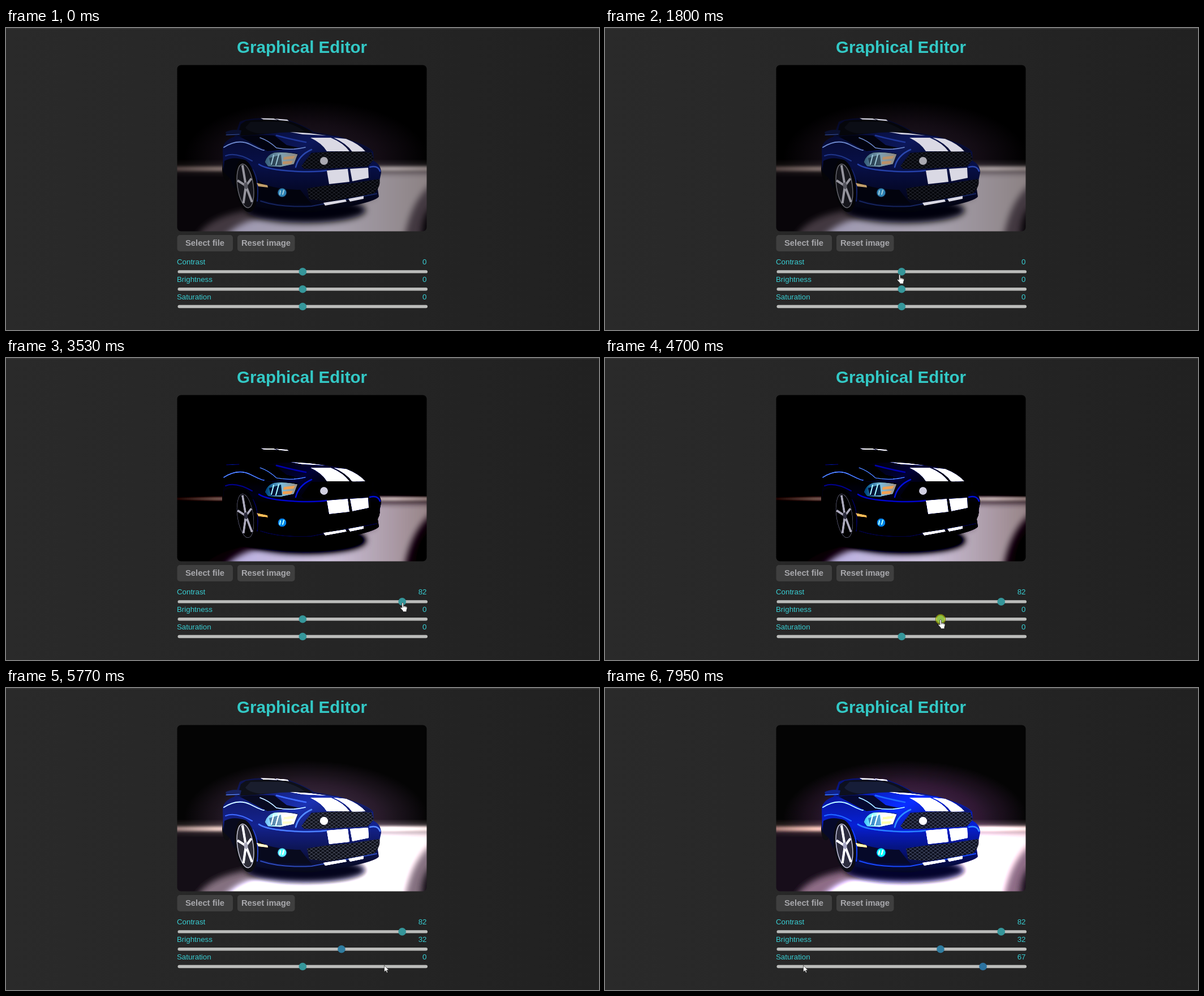
Recreate the animation shown at these times as an HTML page. Size 1048 px wide and 534 px high, loop 8 s.

```html
<!DOCTYPE html>
<html lang="en">
<head>
<meta charset="utf-8">
<title>Graphical Editor</title>
<style>
html, body { margin: 0; width: 100%; height: 100%; overflow: hidden; background: #262626; }
svg { display: block; width: 100vw; height: 100vh; }
text { font-family: "Liberation Sans", Arial, sans-serif; }
.title { font-size: 29.6px; font-weight: bold; fill: #33c9c6; text-anchor: middle; }
.button { font-size: 14.8px; font-weight: bold; fill: #a8a8ac; text-anchor: middle; }
.label { font-size: 13.3px; fill: #38cdd2; }
.value { text-anchor: end; }
.white { fill: #dad9e4; }
.shine { fill: none; stroke-linecap: round; }
</style>
</head>
<body>
<svg viewBox="0 0 1048 534" xmlns="http://www.w3.org/2000/svg">
<defs>
  <linearGradient id="page"><stop stop-color="#2a2a2a"/><stop offset="1" stop-color="#212121"/></linearGradient>
  <radialGradient id="glow"><stop stop-color="#241b27"/><stop offset=".6" stop-color="#130c14"/><stop offset="1" stop-color="#000"/></radialGradient>
  <linearGradient id="horizon"><stop stop-color="#4a3c3b"/><stop offset=".17" stop-color="#7a6a66"/><stop offset=".85" stop-color="#a3999a"/><stop offset="1" stop-color="#857a79"/></linearGradient>
  <linearGradient id="light"><stop stop-color="#9d98b2"/><stop offset=".5" stop-color="#a8a2b0"/><stop offset="1" stop-color="#8b8182"/></linearGradient>
  <linearGradient id="hood" x2="1" y2=".5"><stop stop-color="#060b32"/><stop offset=".55" stop-color="#0c175a"/><stop offset="1" stop-color="#050928"/></linearGradient>
  <linearGradient id="body" x2="0" y2="1"><stop stop-color="#050826"/><stop offset=".5" stop-color="#081048"/><stop offset=".8" stop-color="#040724"/><stop offset="1" stop-color="#01020a"/></linearGradient>
  <linearGradient id="lamp"><stop stop-color="#315a78"/><stop offset=".5" stop-color="#7fa0b0"/><stop offset="1" stop-color="#8e8780"/></linearGradient>
  <pattern id="mesh" width="8" height="6" patternUnits="userSpaceOnUse"><path d="M0 0L8 6M8 0L0 6" stroke="#262831" stroke-width=".9"/></pattern>
  <filter id="soft" x="-20%" y="-40%" width="140%" height="180%"><feGaussianBlur stdDeviation="6"/></filter>
  <filter id="thin" x="-10%" y="-200%" width="120%" height="500%"><feGaussianBlur stdDeviation="3 2"/></filter>
  <clipPath id="frame"><rect x="302.5" y="65.5" width="441" height="294" rx="7"/></clipPath>
  <filter id="adjust" filterUnits="userSpaceOnUse" x="302" y="65" width="442" height="295" color-interpolation-filters="sRGB">
    <feComponentTransfer><feFuncR type="linear"/><feFuncG type="linear"/><feFuncB type="linear"/></feComponentTransfer>
    <feColorMatrix id="saturate" type="saturate" values="1"/>
  </filter>
</defs>

<rect width="1048" height="534" fill="url(#page)"/>
<rect width="1048" height="2" fill="#363636"/>
<text class="title" x="523" y="44">Graphical Editor</text>

<g clip-path="url(#frame)"><g filter="url(#adjust)">
  <rect x="302" y="65" width="442" height="295" fill="#000"/>
  <ellipse cx="530" cy="228" rx="215" ry="100" fill="url(#glow)"/>
  <rect x="302" y="252" width="442" height="108" fill="#080509"/>
  <path fill="#43383f" filter="url(#soft)" d="M640 250H760V310Q732 325 734 375H335Q350 335 430 322L640 300Z"/>
  <path fill="url(#light)" filter="url(#soft)" d="M640 256H752V276Q716 305 704 372H385Q405 345 450 335L650 300Z"/>
  <rect x="292" y="240" width="462" height="16" fill="url(#horizon)" opacity=".3" filter="url(#soft)"/>
  <rect x="292" y="245" width="462" height="8" fill="url(#horizon)" filter="url(#thin)"/>
  <ellipse cx="530" cy="322" rx="106" ry="23" fill="#030208" filter="url(#soft)"/>
  <ellipse cx="390" cy="249" rx="8" ry="20" fill="#050507"/>

  <!-- body and cabin -->
  <path fill="url(#body)" d="M413 166Q425 160 450 159.500L498 162Q522 170 545 184L585 191Q640 206 649 219L650 235Q663 242 663 256L657 285 659 298Q655 306 600 317L540 326Q480 325 443 316L430 240 400 262 384 254 383 212Q386 198 404 192Z"/>
  <path fill="#05060b" d="M424 164Q450 160 498 164 524 172 543 185L470 187 409 191 415 170Z"/>
  <path fill="#0b0d15" d="M432 166L490 166Q514 172 528 183L450 187Q428 184 423 176Z"/>
  <path class="white" d="M450 159.500L473 160 480 162.500 455 161.800ZM476 160.200L497 162 500 164.500 483 163Z"/>
  <path fill="#0a1030" d="M388 184Q400 178 416 181L414 190 390 190Z"/>
  <path class="shine" stroke="#35509a" d="M389 189L412 188"/>
  <path fill="#070b24" d="M541 186L584 191 576 194 546 191Z"/>
  <path fill="#02030d" d="M386 235Q402 226 424 234L406 252 404 285 396 266 384 254ZM440 262Q452 285 520 286L534 304 540 311 480 310 446 302Z"/>

  <!-- hood and side -->
  <path fill="url(#hood)" d="M408 195Q460 185 512 184L586 192Q634 205 648 219L540 219 520 244 508 247 514 221 462 219Z"/>
  <path fill="#02030f" d="M413 192Q440 188 474 190L496 207 520 212 462 218Z"/>
  <g class="shine" stroke="#6f8bd0">
    <path d="M385 211Q410 195 432 206T456 216" stroke-width="1.800"/>
    <path d="M449 194Q464 199 478 212 504 217 529 211" stroke-width="1.600"/>
    <path d="M478 190Q500 196 530 202" stroke="#1f379a" stroke-width="2.500"/>
    <path d="M388 226Q406 219 435 235" stroke="#1f368a" stroke-width="2"/>
    <path d="M512 246Q517 225 540 215" stroke="#2a48ae" stroke-width="2.500"/>
    <path d="M447 241Q462 252 525 254 556 254 566 252" stroke="#2541a9" stroke-width="2.500"/>
    <path d="M643 246Q657 242 661 253" stroke="#2c48ae" stroke-width="2.500"/>
    <path d="M436 250Q448 269 444 306" stroke="#14236a" stroke-width="2"/>
  </g>
  <path class="white" d="M502 184L536 186 566 190 524 188ZM538 194L574 194Q596 203 607 218L567 218Q559 204 538 194ZM579 194L601 196Q624 205 635 218L612 219Q602 204 579 194Z"/>

  <!-- front end -->
  <path fill="#06070c" d="M540 221Q595 216 646 220L650 233 639 245 560 249 527 249 522 244Z"/>
  <path fill="url(#mesh)" d="M540 221Q595 216 646 220L650 233 639 245 560 249 527 249 522 244Z"/>
  <circle cx="562" cy="235" r="7" fill="#aaa9b2"/>
  <path fill="url(#lamp)" stroke="#080e30" d="M457 237Q461 224 474 220 495 218 516 223L509 241 485 246 463 245Z"/>
  <path fill="#142535" d="M465 230L486 224 488 243 468 243Z" opacity=".65"/>
  <path class="shine" d="M469 241L473 225M477 242L482 224" stroke="#9cc5d6" stroke-width="2"/>
  <path fill="#bb9168" d="M491 228L511 226 508 231 490 233ZM489 236L507 235 504 240 489 241Z"/>
  <path class="white" d="M567 252L604 249 607 272 571 276ZM608 249L640 247 641 265 612 271Z"/>
  <path fill="#05060b" d="M532 284Q560 278 607 275L660 267Q663 280 650 293L570 306 536 303Z"/>
  <path fill="url(#mesh)" d="M532 284Q560 278 607 275L660 267Q663 280 650 293L570 306 536 303Z"/>
  <path class="shine" stroke="#15245f" stroke-width="2" d="M450 306Q486 318 540 315L655 293"/>
  <path class="white" d="M561 309L600 303 602 307 564 314ZM605 302L632 297 632 302 608 307Z"/>
  <circle cx="488" cy="291" r="9" fill="#091027"/>
  <circle cx="488" cy="291" r="7.500" fill="#2e82b4"/>
  <path class="shine" stroke="#a6d1df" stroke-width="2" d="M484 294L485 288M489 294L491 287"/>
  <path fill="#c3a06c" d="M443 274L462 278 463 282 446 280Z"/>

  <!-- front wheel -->
  <g transform="translate(424 279) rotate(-8)">
    <ellipse rx="19" ry="47" fill="#040407"/>
    <ellipse cx="-1" rx="14" ry="39" fill="#15151b" stroke="#66666e" stroke-width="1.500"/>
    <g id="spokes" stroke="#96959e" stroke-width="4"></g>
    <ellipse rx="3.500" ry="6" fill="#55555e"/>
  </g>
</g></g>

<rect x="302.500" y="366" width="98.500" height="29" rx="5" fill="#3f3f3f"/>
<rect x="409" y="366" width="101.500" height="29" rx="5" fill="#3f3f3f"/>
<text class="button" x="351.500" y="385">Select file</text>
<text class="button" x="459.500" y="385">Reset image</text>

<g id="sliders"></g>
<circle id="press" r="8.700" fill="#d8e600" fill-opacity=".55" stroke="#777d12" stroke-width="1"/>
<!-- both cursors have their hotspot at 0,0 -->
<path id="arrow" d="M.5 .5V12L3.200 9.600 5 13.500 6.700 12.700 5 9H8.500Z" fill="#fff" stroke="#111" stroke-width=".6"/>
<g id="hand" stroke="#111" stroke-width=".7" stroke-linejoin="round">
  <path fill="#fff" d="M-1.200 1.500Q.1 -.5 1.400 1.500V6L6.400 7.200Q8.400 7.900 8 10.300L6.900 14V16.700H.4V15L-3.800 10.500Q-4.400 8.700 -2.800 8.700L-1.200 10Z"/>
  <path d="M1.400 6V9M3.900 6.800V9M6.100 7.300V9.500" fill="none"/>
</g>
</svg>

<script>
const LOOP = 8000;
const THUMB = 6.8;
const $ = id => document.getElementById(id);

function add(parent, tag, attrs, text = "") {
  const el = document.createElementNS("http://www.w3.org/2000/svg", tag);
  set(el, attrs);
  el.textContent = text;
  parent.append(el);
  return el;
}

function set(el, attrs) {
  for (const key in attrs) el.setAttribute(key, attrs[key]);
}

for (let i = 0; i < 5; i++) {
  const a = (i * 72 - 90) * Math.PI / 180;
  add($("spokes"), "line", { x2: 13 * Math.cos(a) - 1, y2: 37 * Math.sin(a) });
}

// A slider is pressed first; its value is applied a moment later.
const sliders = [
  { name: "Contrast", value: 82, press: 3060, apply: 3210, color: "#35969a" },
  { name: "Brightness", value: 32, press: 4700, apply: 4850, color: "#2f7c9f" },
  { name: "Saturation", value: 67, press: 6000, apply: 6160, color: "#2c729f" }
];

sliders.forEach((s, i) => {
  const g = $("sliders"), y = 430.9 + i * 30.8, base = Math.round(y - 13);
  s.y = y;
  add(g, "text", { class: "label", x: 302, y: base }, s.name);
  s.text = add(g, "text", { class: "label value", x: 743.5, y: base });
  add(g, "rect", { x: 303.5, y: y - 2.7, width: 441.5, height: 5.4, rx: 2.7, fill: "#bbbcba" });
  s.thumb = add(g, "circle", { cy: y, r: THUMB });
});

// Cursor moves: start, end, steps, target x, target y
const moves = [
  [110, 340, 4, 549, 417],
  [520, 800, 5, 533.5, 390],
  [1120, 1200, 2, 548, 390],
  [1350, 1650, 5, 511, 427],
  [1800, 1800, 1, 520.5, 435.5],
  [1880, 2350, 7, 608, 432],
  [2750, 2980, 4, 699.5, 432],
  [3530, 3530, 1, 701, 432],
  [3680, 4150, 7, 593, 462],
  [4930, 4930, 1, 590, 462],
  [5390, 5770, 6, 668, 490],
  [6950, 7580, 9, 350, 494],
  [7870, 7950, 2, 350, 490]
];

function cursorAt(t) {
  let x = 921, y = 533;
  for (const [start, end, steps, tx, ty] of moves) {
    if (t < start) break;
    const gap = (end - start) / (steps - 1) || 1;
    const p = Math.min(steps, Math.floor((t - start) / gap + 1e-6) + 1) / steps;
    const ease = p * p * (3 - 2 * p);
    x += (tx - x) * ease;
    y += (ty - y) * ease;
  }
  return { x, y };
}

function adjust(contrast, brightness, saturation) {
  const slope = 259 * (contrast + 255) / (255 * (259 - contrast));
  const intercept = 0.5 - slope / 2 + slope * brightness * 2 / 255;
  document.querySelectorAll("#adjust [type=linear]").forEach(f => set(f, { slope, intercept }));
  set($("saturate"), { values: 1 + saturation / 100 });
}

let applied = "";

function draw(t) {
  const values = sliders.map(s => t >= s.apply ? s.value : 0);
  if (applied !== values.join()) {
    applied = values.join();
    adjust(...values);
  }

  const c = cursorAt(t);
  let pressed = null, over = false;
  sliders.forEach((s, i) => {
    const x = 524.3 + (t >= s.press ? s.value * 2.145 : 0);
    set(s.thumb, { cx: x, fill: t >= s.apply ? s.color : "#35969a" });
    s.text.textContent = values[i];
    if (t >= s.press && t < s.apply) pressed = { cx: c.x, cy: c.y };
    if (Math.hypot(c.x - x, c.y - s.y) <= THUMB) over = true;
  });
  set($("press"), { ...pressed, visibility: pressed ? "visible" : "hidden" });

  // The pointer becomes a hand only over a thumb.
  const transform = `translate(${c.x.toFixed(1)} ${c.y.toFixed(1)})`;
  set($("arrow"), { transform, visibility: over ? "hidden" : "visible" });
  set($("hand"), { transform, visibility: over ? "visible" : "hidden" });
}

const begin = performance.now();

function tick() {
  // Nothing has entered the stage before the first move.
  const t = (performance.now() - begin) % LOOP;
  draw(t);
  if (t < moves[0][0]) set($("arrow"), { visibility: "hidden" });
  requestAnimationFrame(tick);
}

tick();
</script>
</body>
</html>
```
